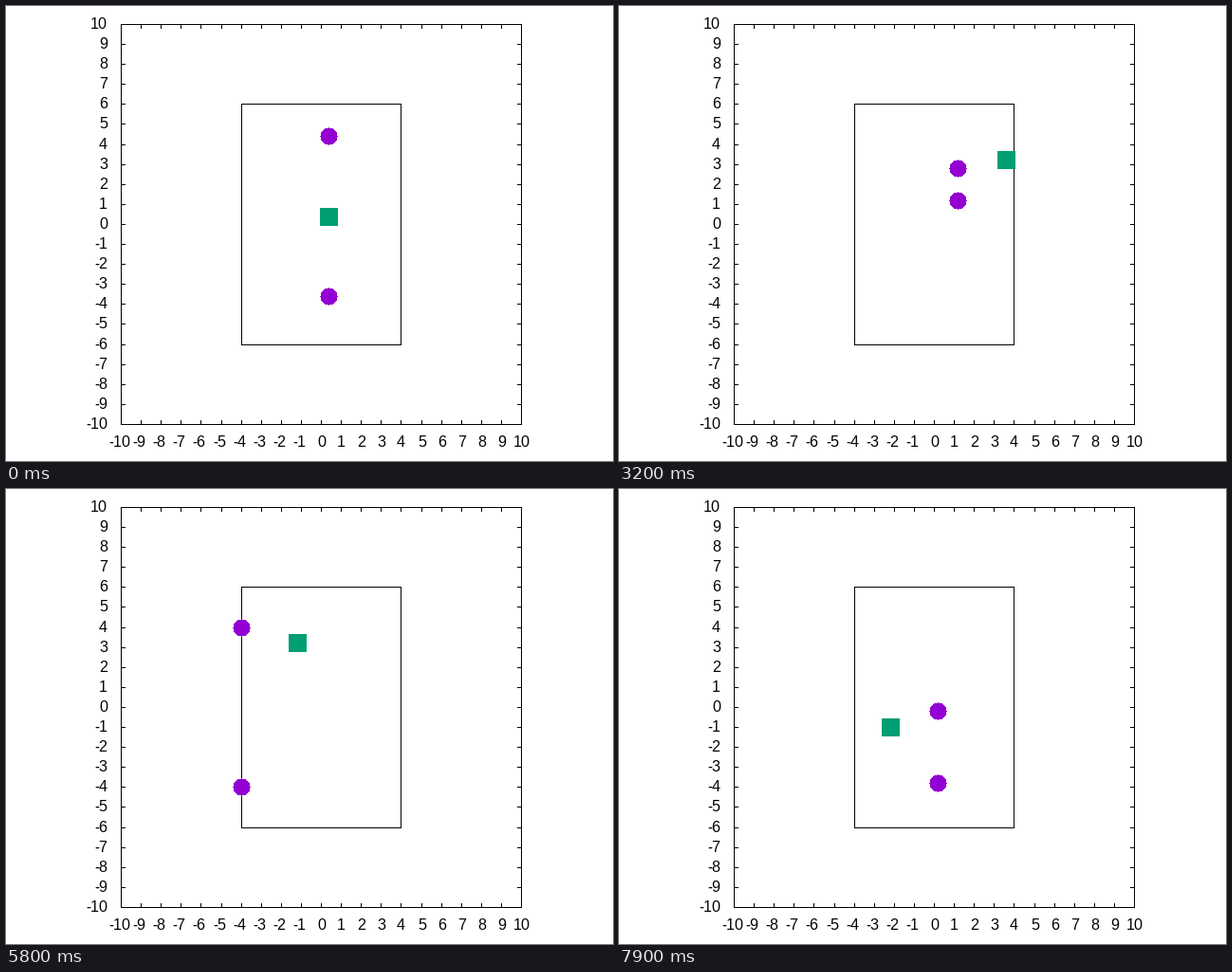
A matplotlib script for the animation above (8 s loop, 640 by 480 pixels).

```python
import numpy as np
import matplotlib.pyplot as plt
from matplotlib.animation import FuncAnimation
from matplotlib.patches import Polygon, Rectangle

W, H, DPI = 640, 480, 100
FRAMES, INTERVAL = 80, 100
STEP = 0.2
PURPLE, GREEN = "#9400d3", "#009e73"
R = 9
TIC = 4

# whole-pixel glyph advances
plt.rcParams["font.family"] = "Liberation Sans"
plt.rcParams["text.hinting"] = "native"
plt.rcParams["text.hinting_factor"] = 1

fig = plt.figure(figsize=(W / DPI, H / DPI), dpi=DPI, facecolor="white")
ax = fig.add_axes([0, 0, 1, 1])
ax.set_xlim(0, W)
ax.set_ylim(H, 0)
ax.axis("off")


def snap(v):
    return int(np.floor(v + 0.5 + 1e-6))


def px(x):
    return snap(121 + 21.1 * (x + 10))


def py(y):
    return H - 1 - snap(38 + 21.1 * (y + 10))


def bar(x0, y0, x1, y1, color="black", z=1):
    """Fill the pixels from (x0, y0) to (x1, y1), both included."""
    rect = Rectangle((x0, y0), x1 - x0 + 1, y1 - y0 + 1, facecolor=color,
                     linewidth=0, antialiased=False, zorder=z)
    return ax.add_patch(rect)


def box(xmax, ymax):
    l, r, t, b = px(-xmax), px(xmax), py(ymax), py(-ymax)
    bar(l, t, r, t)
    bar(l, b, r, b)
    bar(l, t, l, b)
    bar(r, t, r, b)
    return l, r, t, b


def label(x, y, v, ha):
    ax.text(x, y, str(v), fontsize=16 * 72 / DPI, ha=ha, va="baseline")


def disc_outline():
    """Stepped outline of a pixel disc around the pixel (0, 0)."""
    right, left = [], []
    for k in range(-R, R + 1):
        w = int(np.sqrt(R * R - k * k))
        right += [(w + 1, k), (w + 1, k + 1)]
        left += [(-w, k), (-w, k + 1)]
    return np.array(right + left[::-1], float)


def fold(v, m):
    """Reflect a straight path between walls at -m and m."""
    return m - abs((v + m) % (4 * m) - 2 * m)


def ball_pos(i, y0):
    return fold(0.4 + STEP * i, 4), fold(y0 + STEP * i, 6)


def square_pos(i):
    # turning points: ball hits and walls
    x = np.interp(i, [0, 18, 26, 33, 71, 79], [0.4, 4.0, 2.4, 3.8, -3.8, -2.2])
    y = np.interp(i, [0, 17, 26, 45, 79], [0.4, 3.8, 2.0, 5.8, -1.0])
    return x, y


box(4, 6)
L, RIGHT, T, B = box(10, 10)
for v in range(-10, 11):
    x, y = px(v), py(v)
    bar(x, T, x, T + TIC)
    bar(x, B - TIC, x, B)
    bar(L, y, L + TIC, y)
    bar(RIGHT - TIC, y, RIGHT, y)
    label(x + 0.5 - 2 * (v < 0), 465, v, "center")
    label(107, y + 5, v, "right")

DISC = disc_outline()
STARTS = (4.4, -3.6)
balls = [ax.add_patch(Polygon(DISC, closed=True, facecolor=PURPLE, linewidth=0,
                              antialiased=False, zorder=4)) for _ in STARTS]
square = bar(-R, -R, R, R, GREEN, 5)


def update(i):
    for ball, y0 in zip(balls, STARTS):
        x, y = ball_pos(i, y0)
        ball.set_xy(DISC + (px(x), py(y)))
    x, y = square_pos(i)
    square.set_xy((px(x) - R, py(y) - R))
    return [*balls, square]


anim = FuncAnimation(fig, update, frames=FRAMES, interval=INTERVAL,
                     repeat=True, repeat_delay=0, blit=False)
plt.show()
```
